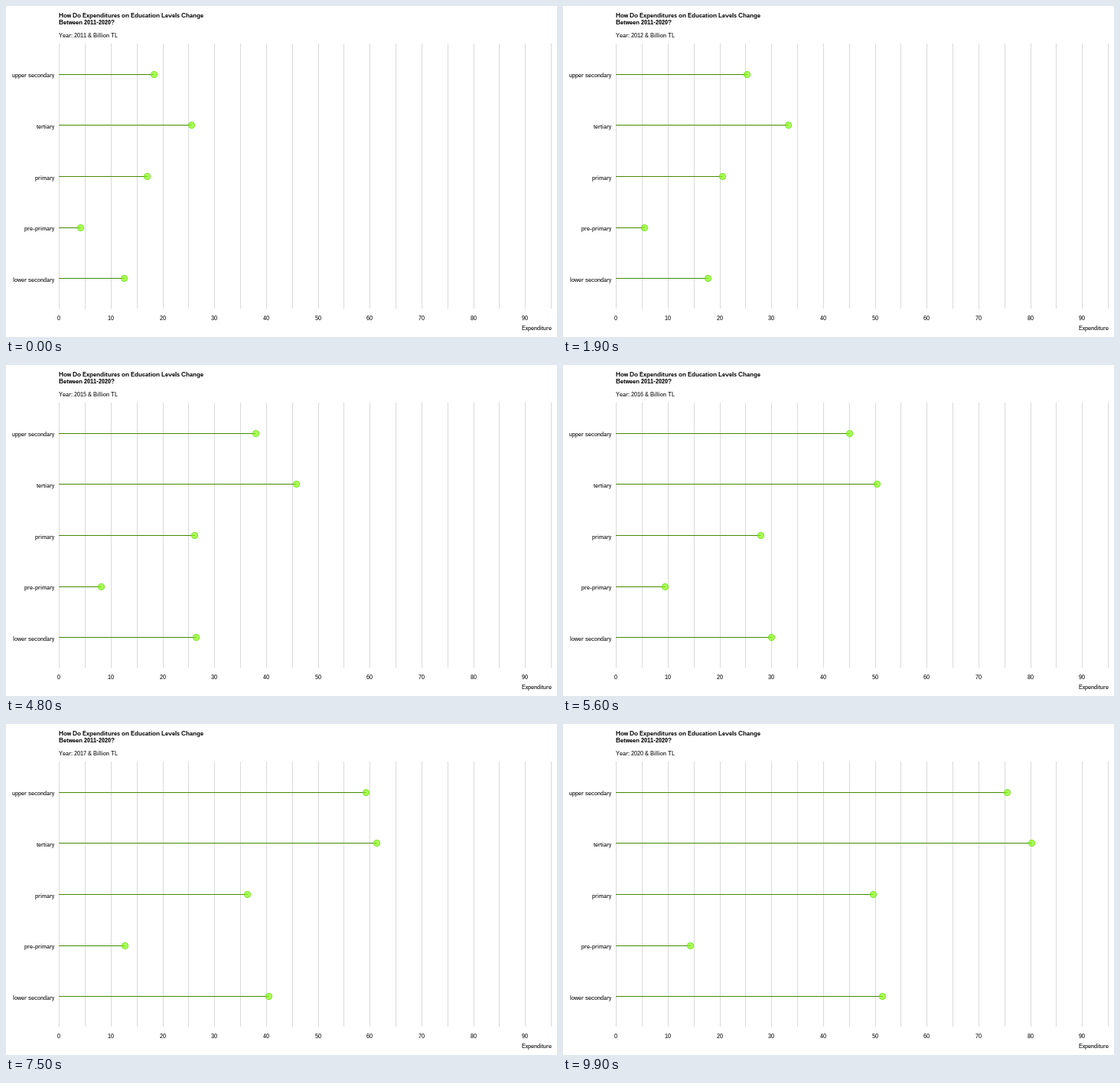
Animation, 720 px wide and 432 px high, one loop 10 s. Source, as a matplotlib script:

```python
import matplotlib as mpl
import matplotlib.pyplot as plt
import numpy as np
from matplotlib.animation import FuncAnimation
from matplotlib.patches import Circle

mpl.rcParams.update({
    "font.family": "Liberation Sans",
    "font.size": 8,
    "text.hinting": "native",
    "text.hinting_factor": 1,
    "text.kerning_factor": 6,
})

W, H = 720, 432
FRAMES, STEPS = 100, 11          # eleven steps per year
LEFT, RIGHT, TOP, BOTTOM = 69, 713, 49, 395
X0, UNIT = 69.3, 6.767           # pixel of zero, pixels per billion
ROW0, ROW_GAP = 89.2, 66.6

GRID, STEM, RING = "#dadada", "#458b00", "#70df1c"
FILL = (0.498, 1.0, 0.0, 0.66)

# spending at the turning points 2011, 2015, 2017, 2019 and 2020
LEVELS = {
    "upper secondary": (18.35, 34.3, 50.2, 72.4, 75.5),
    "tertiary": (25.6, 43.3, 53.85, 72.25, 80.25),
    "primary": (17.0, 25.2, 29.15, 46.9, 49.65),
    "pre-primary": (4.15, 7.4, 10.5, 15.95, 14.35),
    "lower secondary": (12.6, 24.7, 32.5, 52.1, 51.4),
}


def px(value, shift=0.0):
    """Centre of the pixel column that holds a value."""
    return np.floor(X0 + shift + UNIT * value) + 0.5


def stage(t):
    """Years since 2011 to turning points passed, quicker in 2015-2016."""
    return np.interp(t, [0, 4, 5, 6, 8, 9], [0, 1, 1.65, 2, 3, 4])


fig = plt.figure(figsize=(W / 72, H / 72), dpi=72, facecolor="white")
ax = fig.add_axes([0, 0, 1, 1])
ax.set(xlim=(0, W), ylim=(H, 0))
ax.axis("off")


def line(xs, ys, color, z):
    return ax.plot(xs, ys, color=color, lw=1, solid_capstyle="butt",
                   snap=False, zorder=z)[0]


def label(x, y, text, ha="left", **kw):
    # a leading space keeps the glyphs on whole pixels; undo its 2 px
    x -= {"left": 2, "center": 1, "right": 0}[ha]
    return ax.text(x, y, " " + text, ha=ha, va="baseline", color="black", **kw)


for v in range(0, 100, 5):
    x = px(v, 0.4)
    line([x, x], [TOP, BOTTOM], GRID, 1)
    if v % 10 == 0:
        label(x - 0.5, 410, str(v), "center")

label(LEFT, 15, "How Do Expenditures on Education Levels Change", weight="bold")
label(LEFT, 24, "Between 2011-2020?", weight="bold")
label(RIGHT, 423, "Expenditure", "right")
subtitle = label(LEFT, 41, "")

stems, dots = [], []
for k, name in enumerate(LEVELS):
    row = ROW0 + k * ROW_GAP
    y = np.floor(row) + 0.5
    label(63, round(row + 4.2), name, "right")
    stems.append(line([LEFT, LEFT], [y, y], STEM, 2))
    dots.append(ax.add_patch(Circle((LEFT, y), 4.1, facecolor=FILL,
                                    edgecolor=RING, lw=0.8, zorder=3)))


def draw(i):
    s = stage(i / STEPS)
    for stem, dot, keys in zip(stems, dots, LEVELS.values()):
        x = px(np.interp(s, range(len(keys)), keys))
        stem.set_xdata([LEFT, x])
        dot.center = x, dot.center[1]
    subtitle.set_text(f" Year: {2011 + i // STEPS} & Billion TL")
    return [*stems, *dots, subtitle]


anim = FuncAnimation(fig, draw, frames=FRAMES, interval=100,
                     repeat=True, repeat_delay=0, blit=False)
plt.show()
```
